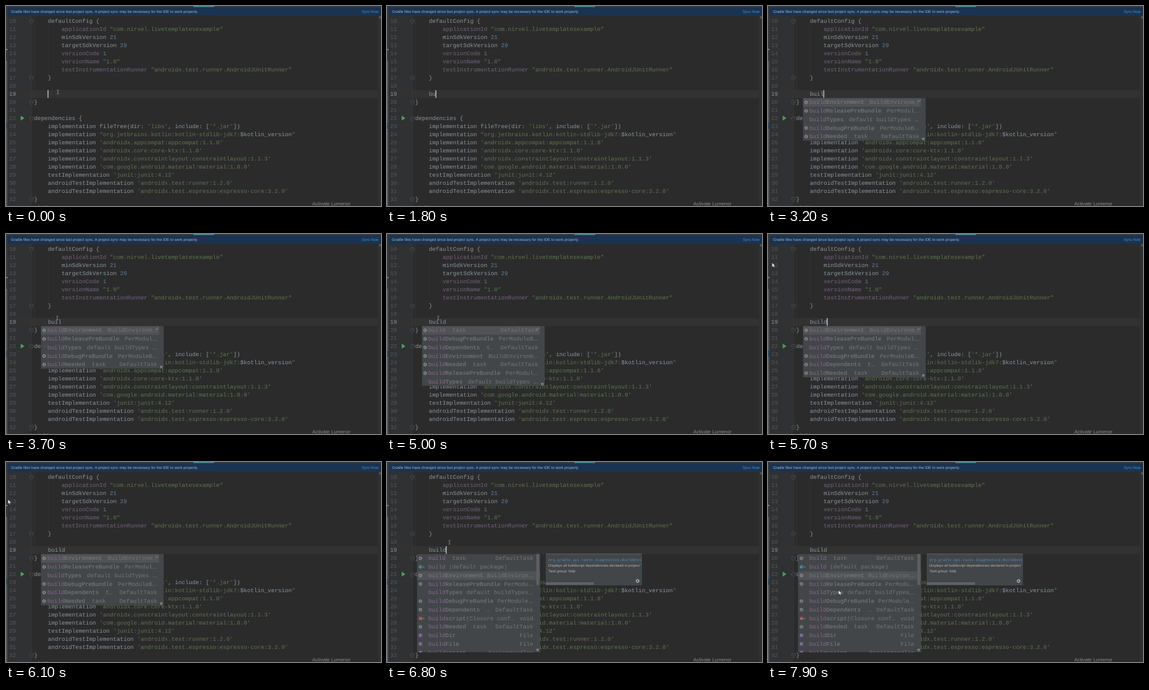
These frames come from a looping animation (600x321 px, 8 s). An HTML page:

```html
<!DOCTYPE html>
<html lang="en">
<head>
<meta charset="utf-8">
<title>Build file code completion</title>
<style>
html, body { margin: 0; width: 600px; height: 321px; overflow: hidden; background: #2b2b2b; }
svg { display: block; }
text { white-space: pre; text-rendering: geometricPrecision; }
.mono { font: 9.167px "Liberation Mono", monospace; }
.ui { font: 6.05px "Liberation Sans", sans-serif; }
</style>
</head>
<body>
<svg id="stage" width="600" height="321" viewBox="0 0 600 321"></svg>
<script>
const LOOP = 8000, CH = 5.5, ROW = 12.98, ITEM = 13.75;
const PLAIN = '#8d959d', STRING = '#5c7750', FIELD = '#766280', NUMBER = '#5b81a0';
const NAME = '#7e8184', MATCH = '#866890', TAIL = '#73777a';
const stage = document.getElementById('stage');

function add(parent, tag, attrs = {}, content) {
  const el = document.createElementNS('http://www.w3.org/2000/svg', tag);
  for (const k in attrs) el.setAttribute(k, attrs[k]);
  if (content !== undefined) el.textContent = content;
  parent.appendChild(el);
  return el;
}
const rect = (p, x, y, width, height, fill) => add(p, 'rect', { x, y, width, height, fill });
const path = (p, d, stroke, width = 0.7, fill = 'none') =>
  add(p, 'path', { d, stroke, 'stroke-width': width, fill });
const mono = (p, x, y, fill, s) => add(p, 'text', { x, y, fill, class: 'mono' }, s);
const ui = (p, x, y, fill, s, style = '') => add(p, 'text', { x, y, fill, class: 'ui', style }, s);
const baseline = n => 27.4 + (n - 10) * ROW;

// ---- editor ----
const code = [
  '    defaultConfig {',
  '        applicationId "com.nirvel.livetemplatesexample"',
  '        minSdkVersion 21',
  '        targetSdkVersion 29',
  '        versionCode 1',
  '        versionName "1.0"',
  '        testInstrumentationRunner "androidx.test.runner.AndroidJUnitRunner"',
  '    }', '', '', '}', '',
  'dependencies {',
  "    implementation fileTree(dir: 'libs', include: ['*.jar'])",
  '    implementation "org.jetbrains.kotlin:kotlin-stdlib-jdk7:$kotlin_version"',
  "    implementation 'androidx.appcompat:appcompat:1.1.0'",
  "    implementation 'androidx.core:core-ktx:1.1.0'",
  "    implementation 'androidx.constraintlayout:constraintlayout:1.1.3'",
  "    implementation 'com.google.android.material:material:1.0.0'",
  "    testImplementation 'junit:junit:4.12'",
  "    androidTestImplementation 'androidx.test:runner:1.2.0'",
  "    androidTestImplementation 'androidx.test.espresso:espresso-core:3.2.0'",
  '}'
];
const TOKEN = /(\$\w+|"[^"$]*"?|'[^']*'|\b\d+\b|applicationId|version(?:Code|Name)|testInstrumentationRunner)/;

function tokenColor(s) {
  if (/^["']/.test(s)) return STRING;
  if (/^\d/.test(s)) return NUMBER;
  return TOKEN.test(s) && s[0] !== '$' ? FIELD : PLAIN;
}

rect(stage, 0, 0, 600, 321, '#2b2b2b');
rect(stage, 2.5, 16, 38.5, 305, '#2f3132');
rect(stage, 2.5, 135, 592.5, 12.8, '#323232');
rect(stage, 0, 0, 2.5, 321, '#383b3d');
rect(stage, 0, 88, 2, 233, '#55585a');
rect(stage, 0, 187, 2, 10, '#2d4a68');
path(stage, 'M0 69h2.4l-1.2 2.4z', 'none', 0, '#a8abad');
rect(stage, 595, 16, 5, 305, '#303030');
rect(stage, 597, 16, 3, 4, '#505252');
rect(stage, 0, 0, 600, 2, '#36393b');
rect(stage, 300, 0, 33, 1.6, '#4a88ad');
rect(stage, 2.5, 2, 597.5, 14, '#1a3350');
ui(stage, 8, 11.4, '#a9b4bf', 'Gradle files have changed since last project sync. A project sync may be necessary for the IDE to work properly.');
ui(stage, 569, 11.4, '#4290d8', 'Sync Now');
path(stage, 'M41 16V316', '#3b3d3e', 0.6);
path(stage, 'M45.3 16V148M67.3 30V109', '#383a3a', 0.6);

code.forEach((line, i) => {
  const n = 10 + i, y = baseline(n);
  mono(stage, 5, y, n === 19 ? '#8f9498' : '#55585b', n);
  const indent = line.search(/\S/);
  if (indent < 0) return;
  const t = add(stage, 'text', { x: 45 + indent * CH, y, class: 'mono' });
  line.trim().split(TOKEN).filter(Boolean).forEach(s => add(t, 'tspan', { fill: tokenColor(s) }, s));
});
for (const n of [10, 17, 20, 22, 32]) {
  const y = baseline(n) - 2.4;
  path(stage, `M38 ${y - 3}h5.5v4.2l-2.75 1.8l-2.75 -1.8zM39.3 ${y - 0.4}h3`, '#5c5f60', 0.6, '#2b2b2b');
}
path(stage, 'M23.5 176L29.5 180L23.5 184Z', 'none', 0, '#4c9f56');
ui(stage, 52, 324.6, '#8b8f92', 'build', 'font-size:7px');
ui(stage, 490, 320, '#8b8b8b', 'Activate Lumenor', 'font-size:7.86px');

const typed = mono(stage, 67, baseline(19), PLAIN, '');
const caret = rect(stage, 66.6, 135, 1.3, 12.5, '#d0d0d0');

// ---- completion popups ----
function gear(p, x, y, color = '#8c8f91') {
  add(p, 'circle', { cx: x, cy: y, r: 1.8, fill: 'none', stroke: color, 'stroke-width': 1.2 });
  add(p, 'circle', { cx: x, cy: y, r: 2.7, fill: 'none', stroke: color, 'stroke-width': 1, 'stroke-dasharray': '1.4 1.4' });
}
function badge(p, kind, x, y) {
  if (kind === 'g') gear(p, x, y);
  if (kind === 'p') {
    rect(p, x - 3, y - 3, 6, 6, '#675680');
    path(p, `M${x - 1} ${y + 1.8}v-3.6h2v2h-2`, '#a598b3', 0.6);
  }
  if (kind === 'c' || kind === 'm') {
    add(p, 'circle', { cx: x, cy: y, r: 3, fill: kind === 'c' ? '#3c738c' : '#8a4c53' });
    path(p, `M${x + 4} ${y - 1.5}l2.8 1.7l-2.8 1.7z`, 'none', 0, '#56855a');
    ui(p, x - 1.6, y + 1.8, '#b4b8bb', kind, 'font-size:5px');
  }
}
// item: [icon, name, note, type]; a type ending in "…" is cut short
function item(p, [icon, name, note, type], y, iconX, right) {
  badge(p, icon, iconX, y);
  const t = add(p, 'text', { x: 66, y: y + 2.8, class: 'mono' });
  add(t, 'tspan', { fill: MATCH }, name.slice(0, 5));
  add(t, 'tspan', { fill: NAME }, name.slice(5));
  add(t, 'tspan', { fill: TAIL }, note);
  const cut = type.endsWith('…'), body = cut ? type.slice(0, -1) : type;
  mono(p, right - (cut ? 8 : 0) - body.length * CH, y + 2.8, TAIL, body);
  if (cut) for (let i = 0; i < 3; i++) rect(p, right - 7 + i * 2.5, y + 1.8, 1, 1, TAIL);
}
function popup(x, right, height, items, { sel, selRight, iconX, textRight }) {
  const g = add(stage, 'g');
  const id = 'clip' + stage.querySelectorAll('clipPath').length;
  rect(add(g, 'clipPath', { id }), x, 147.5, right - x, height, '#000');
  const body = add(g, 'g', { 'clip-path': `url(#${id})` });
  rect(body, x, 147.5, right - x, height, '#434648');
  rect(body, x, 148 + sel * ITEM, selRight - x, ITEM, '#505355');
  items.forEach((it, i) => item(body, it, 154.6 + i * ITEM, iconX, textRight));
  return g;
}
function piMark(g, x, y) { path(g, `M${x - 2} ${y - 1.5}h4M${x - 1} ${y - 1.5}v3.5M${x + 1} ${y - 1.5}v3.5`, '#a9acae', 0.8); }

const env = ['g', 'buildEnvironment', '', 'BuildEnvironm…'];
const release = ['g', 'buildReleasePreBundle', '', 'PerModul…'];
const types = ['', 'buildTypes', '', 'default buildTypes …'];
const debug = ['g', 'buildDebugPreBundle', '', 'PerModuleB…'];
const depends = ['g', 'buildDependents', '  t…', 'DefaultTask'];
const needed = ['g', 'buildNeeded', '  task', 'DefaultTask'];
const build = ['g', 'build', '  task', 'DefaultTask'];
const withType = (it, type) => [...it.slice(0, 3), type];

function smallPopup(items) {
  const h = items.length * ITEM;
  const g = popup(56, 252.5, h, items, { sel: 0, selRight: 245, iconX: 61, textRight: 242 });
  path(g, 'M243 150v3h-4m1.3 -1.3l-1.3 1.3l1.3 1.3', '#8b8e90', 0.7);
  piMark(g, 248.5, 145 + h);
  return g;
}
const full = popup(48, 245, 158, [
  build,
  ['c', 'build', ' (default package)', ''],
  withType(env, 'BuildEnviron…'),
  withType(release, 'PerModu…'),
  withType(types, 'default buildTypes…'),
  withType(debug, 'PerModule…'),
  ['g', 'buildDependents', '  …', 'DefaultTask'],
  ['m', 'buildscript', '(Closure conf…', 'void'],
  needed,
  ['p', 'buildDir', '', 'File'],
  ['p', 'buildFile', '', 'File'],
  ['p', 'buildscript', '', 'ScriptHandler']
], { sel: 2, selRight: 245, iconX: 53.5, textRight: 234 });
rect(full, 239, 147.5, 4.5, 50, '#5d6062');
piMark(full, 241, 302);

const lists = {
  short: smallPopup([env, release, types, debug, needed]),
  sorted: smallPopup([build, debug, depends, env, needed, release, types]),
  recent: smallPopup([env, release, types, debug, depends, needed]),
  full
};

// ---- documentation popup ----
const doc = add(stage, 'g');
rect(add(doc, 'clipPath', { id: 'docClip' }), 254, 147, 154, 51, '#000');
const page = add(doc, 'g', { 'clip-path': 'url(#docClip)' });
rect(page, 254, 147, 154, 51, '#434648');
rect(page, 254, 147, 154, 1, '#5b5e60');
rect(page, 254, 161, 154, 0.6, '#55585a');
add(page, 'text', { x: 258, y: 158.6, fill: '#4f8fc9', class: 'mono', style: 'font-size:5.95px' }, 'org.gradle.api.tasks.diagnostics.BuildEnvironmentReportTask');
ui(page, 258, 168.2, '#b0b4b7', "Displays all buildscript dependencies declared in project '", 'font-size:5.9px');
ui(page, 258, 176.8, '#b0b4b7', 'Task group: help', 'font-size:5.9px;font-style:italic');
rect(page, 254, 193, 77, 4, '#606365');
gear(page, 401, 191, '#b0b3b5');

// ---- pointer ----
const beam = path(stage, 'M-1.6 -3h1.2l.4 .4l.4 -.4h1.2M0 -2.6v5.2M-1.6 3h1.2l.4 -.4l.4 .4h1.2', '#ababab', 0.7);
const arrow = path(stage, 'M0 0V7L1.7 5.5L2.8 8L4 7.5L2.9 5.1H5Z', '#222', 0.4, '#f2f2f2');

// ---- timeline ----
const textSteps = [[0, ''], [1500, 'b'], [1800, 'bu'], [2800, 'bui'], [3200, 'buil'], [4000, 'build'], [5300, 'buil'], [5600, 'build']];
const listSteps = [[0, ''], [2900, 'short'], [4200, 'sorted'], [5300, 'short'], [5600, 'recent'], [6200, 'full']];
const pointerSteps = [[0, 'beam'], [1500, ''], [3300, 'beam'], [5500, 'arrow'], [6300, 'beam'], [7200, 'arrow']];
const pointerPath = [[0, 83, 138], [1500, 83, 138], [3300, 82, 135], [5200, 82, 135], [5700, 6.5, 46], [6100, 3, 60],
  [6600, 100, 129], [7000, 100, 129], [7300, 108, 165], [7800, 113, 206], [8000, 113, 206]];
const DOC_AT = 6500, BLINK = 300;

const stepAt = (steps, t) => steps.filter(s => s[0] <= t).pop();
function pointAt(t) {
  const i = pointerPath.findIndex(p => p[0] > t);
  const [a, ax, ay] = pointerPath[i - 1], [b, bx, by] = pointerPath[i];
  const k = (t - a) / (b - a);
  return [ax + (bx - ax) * k, ay + (by - ay) * k];
}
const show = (el, on) => el.setAttribute('visibility', on ? 'visible' : 'hidden');

function draw(t) {
  const [since, word] = stepAt(textSteps, t);
  typed.textContent = word;
  const idle = Math.max(0, t - (since || 100));
  show(caret, Math.floor(idle / BLINK) % 2 === 0);
  caret.setAttribute('x', 66.6 + word.length * CH);

  const list = stepAt(listSteps, t)[1];
  for (const k in lists) show(lists[k], k === list);
  show(doc, t >= DOC_AT);

  const kind = stepAt(pointerSteps, t)[1], [x, y] = pointAt(t);
  for (const [el, name] of [[beam, 'beam'], [arrow, 'arrow']]) {
    show(el, kind === name);
    el.setAttribute('transform', `translate(${x} ${y})`);
  }
}

const start = performance.now();
function tick() {
  draw((performance.now() - start) % LOOP);
  requestAnimationFrame(tick);
}
draw(0);
requestAnimationFrame(tick);
</script>
</body>
</html>
```
